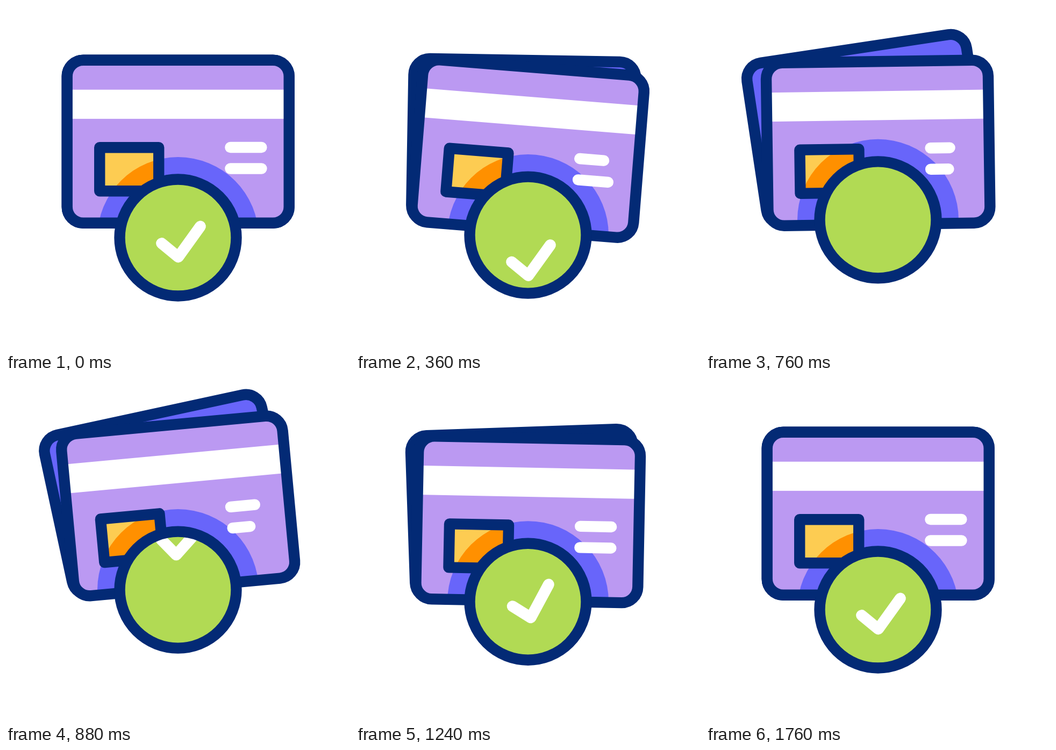
Write an HTML page with a canvas that moves like this. It is 640 px wide and 640 px high and loops after 2080 ms.

```html
<!DOCTYPE html>
<html lang="en">
<head>
<meta charset="utf-8">
<title>Card payment approved</title>
<style>
  html, body { margin: 0; width: 100%; height: 100%; overflow: hidden; background: #fff; }
  canvas { display: block; width: 100vmin; height: 100vmin; }
</style>
</head>
<body>
<canvas id="stage" width="640" height="640"></canvas>
<script>
const ctx = document.getElementById('stage').getContext('2d');
const LOOP = 2080, STEP = 40;
const NAVY = '#032a75', LILAC = '#bb99f2', VIOLET = '#6865fa', YELLOW = '#fdcc52',
      ORANGE = '#ff9000', GREEN = '#b1da54', WHITE = '#fff';

const smooth = u => u * u * (3 - 2 * u);
const easeIn = u => u * u;
const easeOut = u => 1 - (1 - u) ** 2;
const rad = deg => deg * Math.PI / 180;

// Keys are [time, value, easing towards this key].
function track(...keys) {
  return t => {
    const i = keys.findIndex(k => k[0] > t);
    if (i < 0) return keys[keys.length - 1][1];
    if (i === 0) return keys[0][1];
    const [t0, v0] = keys[i - 1], [t1, v1, ease = smooth] = keys[i];
    return v0 + (v1 - v0) * ease((t - t0) / (t1 - t0));
  };
}

const motion = {
  tilt: track([80, 0], [500, 6.2], [1020, -7.8], [1320, 3], [1760, 0]),
  lift: track([80, 0], [556, 21], [1020, -24], [1290, 14.5], [1760, 0]),
  fan: track([80, 0], [680, 8], [1040, 6.1], [1440, 0]),
  badge: track([200, 431], [900, 394], [1500, 431]),
  line1: track([80, 58], [640, 32], [1120, 58]),
  line2: track([260, 58], [840, 32], [1250, 58]),
  tickY: track([80, 0], [640, 158, easeIn], [760, 158], [760, -158], [1356, 0, easeOut]),
  tickTurn: track([780, 0], [1030, 17], [1260, -8], [1510, 12], [1760, 0])
};

function shape(build) {
  const path = new Path2D();
  build(path);
  return path;
}
const disc = r => shape(p => p.arc(0, 0, r, 0, 7));
const card = shape(p => p.roundRect(-206.5, -151.5, 413, 303, 30));
const chip = shape(p => p.rect(-146, 11, 110, 81));
const tick = shape(p => { p.moveTo(-30.5, 10.5); p.lineTo(.5, 36); p.lineTo(41.5, -21); });
const ring = disc(108.5), halo = disc(150);

function fill(path, color) {
  ctx.fillStyle = color;
  ctx.fill(path);
}
function stroke(path, color, width = 20.4) {
  ctx.strokeStyle = color;
  ctx.lineWidth = width;
  ctx.stroke(path);
}
function scoped(draw) {
  ctx.save();
  draw();
  ctx.restore();
}

// Halo stays with the badge and shows only inside the given path.
function haloInside(path, color, badgeY) {
  scoped(() => {
    ctx.clip(path);
    ctx.setTransform(1, 0, 0, 1, 320, badgeY);
    fill(halo, color);
  });
}

function drawBackCard(fan) {
  scoped(() => {
    ctx.translate(-200, 143);
    ctx.rotate(rad(-fan));
    ctx.translate(200, -143);
    fill(card, VIOLET);
    stroke(card, NAVY);
  });
}

function drawFrontCard(now) {
  fill(card, LILAC);
  ctx.fillStyle = WHITE;
  ctx.fillRect(-206, -96.5, 412, 54.2);
  haloInside(card, VIOLET, now.badge);
  fill(chip, YELLOW);
  haloInside(chip, ORANGE, now.badge);
  stroke(chip, NAVY);
  [[10.8, now.line1], [50.3, now.line2]].forEach(([y, length]) =>
    stroke(shape(p => { p.moveTo(97.2, y); p.lineTo(97.2 + length, y); }), WHITE));
  stroke(card, NAVY);
}

function drawBadge(now) {
  ctx.translate(320, now.badge);
  fill(ring, GREEN);
  scoped(() => {
    ctx.clip(ring);
    ctx.translate(0, now.tickY);
    ctx.rotate(rad(now.tickTurn));
    stroke(tick, WHITE, 20.8);
  });
  stroke(ring, NAVY);
}

function render(t) {
  const now = {};
  for (const name in motion) now[name] = motion[name](t);
  ctx.fillStyle = WHITE;
  ctx.fillRect(0, 0, 640, 640);
  ctx.lineCap = ctx.lineJoin = 'round';
  scoped(() => {
    ctx.translate(320.2, 252.2 + now.lift);
    ctx.rotate(rad(now.tilt));
    drawBackCard(now.fan);
    drawFrontCard(now);
  });
  scoped(() => drawBadge(now));
}

function loop() {
  render(Math.floor(performance.now() % LOOP / STEP) * STEP);
  requestAnimationFrame(loop);
}
loop();
</script>
</body>
</html>
```
